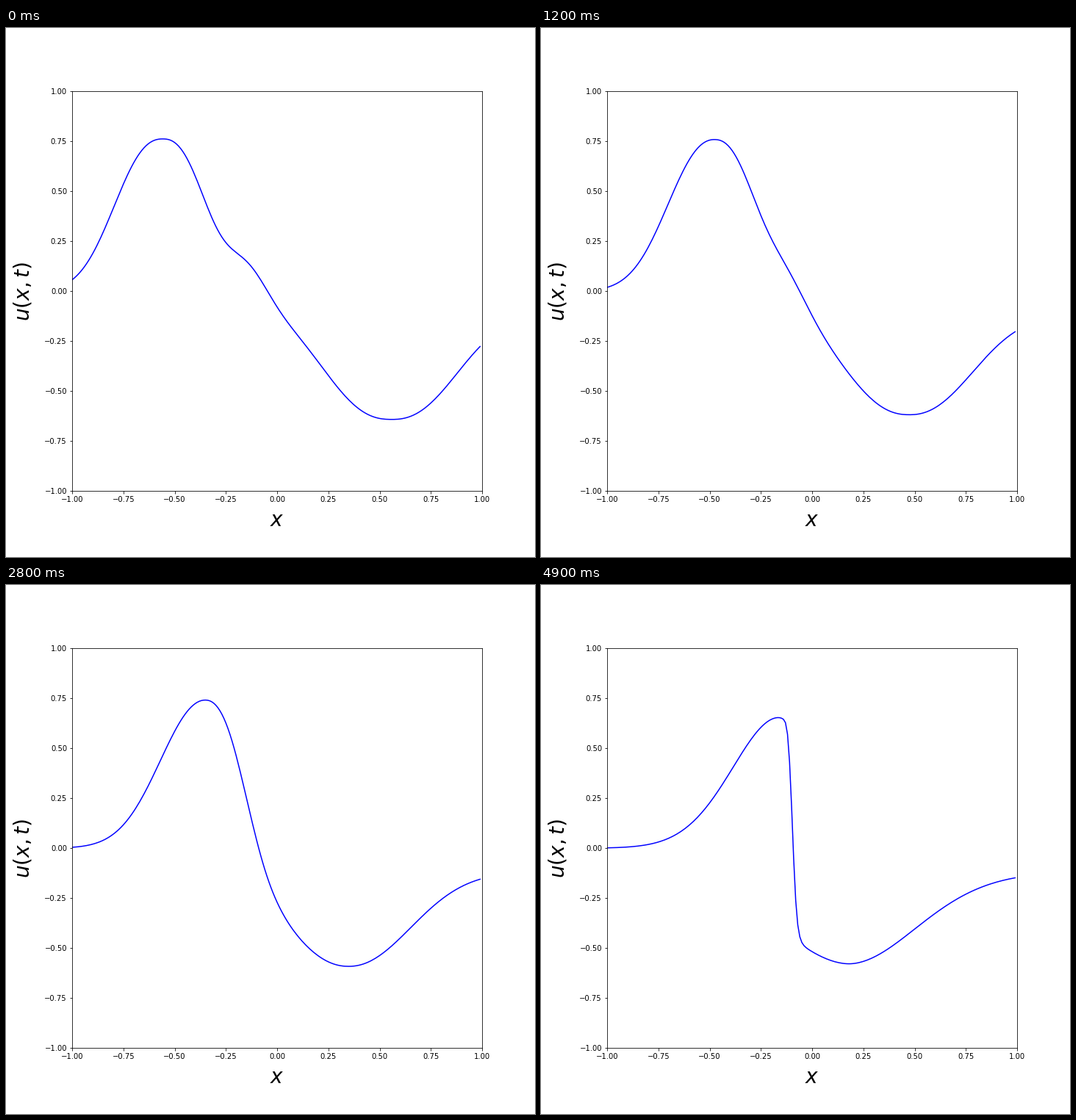
Animation, 720 px wide and 720 px high, one loop 5000 ms. Source, as a matplotlib script:

```python
import numpy as np
import matplotlib.pyplot as plt
from matplotlib.animation import FuncAnimation

FRAMES, INTERVAL = 50, 100
x = np.arange(-1, 0.995, 0.01)


def bump(center, left, right, power):
    """Bell of height 1 with its own width on each side."""
    offset = x - center
    width = np.where(offset < 0, left, right)
    return np.exp(-np.abs(offset / width)**power)


def front(center, width):
    """Smooth step from 0 to 1 that starts more abruptly than it ends."""
    z = (x - center) / width
    return (1 + np.tanh((z + 0.03 * np.minimum(z, 0)**3) / 2)) / 2


def wave(frame):
    """A crest and a trough approach each other until a steep front forms."""
    t = frame / (FRAMES - 1)
    late = t**4
    spread = 0.555 - 0.334 * t - 0.056 * t**2
    power = 2.42 - 0.52 * t

    crest = (0.763 - 0.109 * t**3) * bump(-spread, 0.3 + 0.025 * late,
                                          0.27, power)
    depth = 0.523 - 0.095 * t + 0.031 * late
    trough = -0.12 - depth * bump(spread + 0.015 * late, 0.403 + 0.1 * late,
                                  0.403 + 0.07 * late, power)
    shoulder = 0.17 * (1 - t**2)**5 * bump(-0.15 + 0.1 * t, 0.14, 0.14, 2)

    mix = front(-0.107 + 0.012 * late, 0.0105 + 0.0895 * (1 - t**2)**1.55)
    return crest * (1 - mix) + trough * mix + shoulder


plt.rcParams.update({"font.family": "DejaVu Sans", "font.size": 10})
fig = plt.figure(figsize=(10, 10), dpi=72, facecolor="white")
ax = fig.add_axes([0.125, 0.125, 0.775, 0.755])
ticks = np.linspace(-1, 1, 9)
ax.set(xlim=(-1, 1), ylim=(-1, 1), xticks=ticks, yticks=ticks)
label = dict(fontsize=28, ha="center", va="baseline", rotation_mode="anchor")
fig.text(369 / 720, 1 - 677.5 / 720, "$x$", **label)
fig.text(31.5 / 720, 1 - 358.5 / 720, "$u(x,t)$", rotation=90, **label)
line, = ax.plot(x, wave(0), color="#0000ff", lw=1.5)


def update(frame):
    line.set_ydata(wave(frame))
    return line,


animation = FuncAnimation(fig, update, frames=FRAMES, interval=INTERVAL,
                          repeat=True, repeat_delay=0)
plt.show()
```
